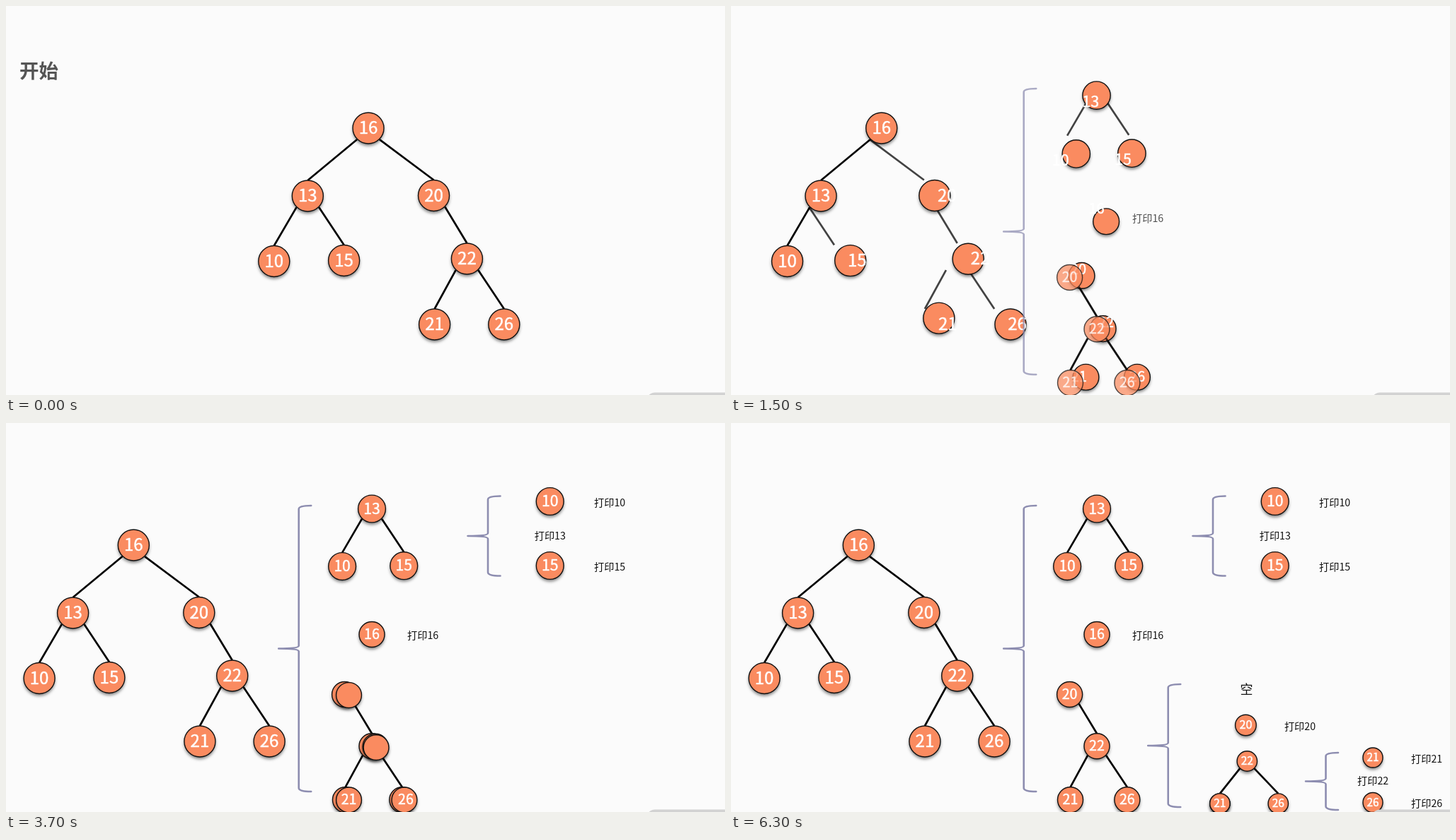
An HTML page with a canvas that plays this animation: 1016x551 px, repeating every 6.4 s.

```html
<!DOCTYPE html>
<html lang="zh">
<head>
<meta charset="utf-8">
<style>
  html, body { margin: 0; overflow: hidden; background: #fbfbfb; }
  canvas { display: block; }
</style>
</head>
<body>
<canvas id="stage" width="1016" height="551"></canvas>
<script>
const ctx = document.getElementById('stage').getContext('2d');
const FONT = '"Noto Sans CJK SC", "Noto Sans CJK", "Noto Sans CJK JP", sans-serif';
const LOOP = 6400, MOVE = 1000, RADIUS = 22;

const parent = { 13: 16, 20: 16, 10: 13, 15: 13, 22: 20, 21: 22, 26: 22 };
const tree = {
  16: [512, 173], 13: [426.3, 269], 20: [604.5, 268.5], 10: [378.8, 361.5],
  15: [477.6, 360.5], 22: [651.4, 358], 21: [605.6, 451], 26: [703.8, 451]
};

const clamp = x => Math.min(1, Math.max(0, x));
const ease = t => 1 - (1 - t ** 1.65) ** 2.87;
const fadeIn = t => clamp((t - 0.48) / 0.3);
const mix = (a, b, p) => a.map((n, i) => n + (b[i] - n) * p);
const twice = alpha => 1 - (1 - alpha) ** 2;

const isUnder = (v, root) => v === root || (v in parent && isUnder(parent[v], root));
const family = root => Object.keys(tree).map(Number).filter(v => isUnder(v, root));

// A copy of the subtree with its root at x, y: value -> [x, y, radius]
function place(root, x, y, r, spread = 1) {
  const scale = r / RADIUS, [rootX, rootY] = tree[root];
  return Object.fromEntries(family(root).map(v => [v, [
    x + (tree[v][0] - rootX) * scale * spread, y + (tree[v][1] - rootY) * scale, r]]));
}

const whole = place(16, 512, 173, RADIUS);
const moved = place(16, 180.3, 173, RADIUS);
const leftTree = place(13, 517, 121.5, 19.4);
const rightTree = place(20, 478.6, 384.5, 18);
const split = { ...leftTree, 16: [517, 299.5, 18], ...rightTree };
const leftLeaves = { 10: [768.7, 111, 19.4], 15: [768.7, 202, 19.4] };
const smallTree = place(22, 729.3, 479, 14.2, 1.3);
const rightSplit = { 20: [727.4, 428, 14.8], ...smallTree };
const rightLeaves = { 21: [907, 474, 14], 26: [907, 537.5, 14] };

// Discs are [value, value of the node the disc travels from], in stacking order
const movedDiscs = [[16, 16], [13, 13], [20, 13], [10, 10], [15, 10], [22, 15], [26, 21], [21, 15]];
const steps = [
  { start: 800, from: whole, to: split, brace: [413.7, 319.5, 202.5], printed: [16], gap: 50,
    discs: [[13, 16], [15, 20], [10, 20], [16, 22], [20, 22], [22, 21], [26, 26], [21, 26]] },
  { start: 2345, from: split, to: leftLeaves, brace: [681, 160, 56.5], printed: [10, 15], gap: 62.3,
    middle: 13, discs: [[10, 13], [15, 15]] },
  { start: 3645, from: split, to: rightSplit, brace: [617.7, 457, 87], printed: [20], gap: 54.5,
    late: [20, 22], discs: [[20, 20], [22, 22], [26, 22], [21, 26], [21, 21]] },
  { start: 4945, from: rightSplit, to: rightLeaves, brace: [840.5, 507.5, 40.5], printed: [21, 26], gap: 54,
    middle: 22, late: [21, 26], discs: [[21, 22], [26, 26]] }
];

function faded(alpha, draw) {
  ctx.globalAlpha = alpha;
  draw();
  ctx.globalAlpha = 1;
}

function disc([x, y, r], shadow = true) {
  ctx.beginPath();
  ctx.arc(x, y, r, 0, Math.PI * 2);
  ctx.save();
  if (shadow) {
    ctx.shadowColor = 'rgba(0,0,0,.5)';
    ctx.shadowBlur = 4;
    ctx.shadowOffsetY = 3;
  }
  ctx.fillStyle = '#fa8b60';
  ctx.fill();
  ctx.restore();
  ctx.strokeStyle = '#111';
  ctx.lineWidth = 1.4;
  ctx.stroke();
}

function number(v, [x, y, r]) {
  const size = r * 1.09;
  ctx.font = `500 ${size}px ${FONT}`;
  ctx.textAlign = 'center';
  ctx.fillStyle = ctx.strokeStyle = '#fff';
  ctx.lineWidth = 0.5;
  ctx.fillText(v, x, y + size * 0.335);
  ctx.strokeText(v, x, y + size * 0.335);
}

function label(str, x, y, size = 14.2, color = '#111', weight = 400) {
  ctx.font = `${weight} ${size}px ${FONT}`;
  ctx.textAlign = 'left';
  ctx.fillStyle = color;
  ctx.fillText(str, x, y + size * 0.37);
}

// Each edge runs from the parent's lower rim to the top of the child
function edges(layout, children, alpha = 1) {
  faded(alpha, () => {
    ctx.strokeStyle = '#000';
    ctx.lineWidth = 2.7;
    ctx.beginPath();
    for (const v of children) {
      const [x1, y1, r] = layout[parent[v]], [x2, y2] = layout[v];
      ctx.moveTo(x1 + Math.sign(x2 - x1) * r * 0.72, y1 + r * 0.73);
      ctx.lineTo(x2, y2 - r);
    }
    ctx.stroke();
  });
}

function bracket(x, mid, half) {
  ctx.strokeStyle = '#8d8db0';
  ctx.lineWidth = 2.6;
  ctx.lineCap = 'round';
  ctx.beginPath();
  for (const side of [-1, 1]) {
    const end = mid + side * half;
    ctx.moveTo(x + 17.5, end);
    ctx.quadraticCurveTo(x, end, x, end - side * 5);
    ctx.lineTo(x, mid + side * 4);
    ctx.quadraticCurveTo(x, mid, x - 28.5, mid);
  }
  ctx.stroke();
  ctx.lineCap = 'butt';
}

function drawStart() {
  label('开始', 19, 92, 27.5, '#555', 700);
  edges(whole, Object.keys(parent));
  for (const v in whole) {
    disc(whole[v]);
    number(v, whole[v]);
  }
}

// The whole tree slides left while its branches fade out and in again
function drawSlide(t) {
  const p = ease(t), shown = fadeIn(t), gone = clamp(1 - t / 0.4);
  const spine = [13, 10], branches = [20, 15, 22, 21, 26];
  edges(mix2(whole, moved, p), spine);
  edges(whole, spine, gone);
  edges(whole, branches, twice(gone));
  edges(moved, branches, shown);
  edges(split, [10, 15, 22, 21, 26], shown);
  for (const [v, origin] of movedDiscs) {
    disc(mix(whole[origin], moved[v], p));
    number(v, mix(whole[v], moved[v], p));
  }
}

function mix2(from, to, p) {
  return Object.fromEntries(Object.keys(to).map(v => [v, mix(from[v], to[v], p)]));
}

// Discs go below the numbers; late numbers appear once the move is over
function drawStep({ from, to, brace, printed, gap, middle, discs, late = [] }, t) {
  const p = ease(t), places = mix2(from, to, p);
  faded(fadeIn(t), () => {
    bracket(...brace);
    for (const v of printed) label('打印' + v, to[v][0] + gap, to[v][1] + 1.5);
    if (middle) label('打印' + middle, to[printed[0]][0] - 22, brace[1] - 0.5);
    if (to === rightSplit) label('空', 719.5, 377.5, 18);
  });
  if (to === rightSplit) edges(smallTree, [21, 26], twice(fadeIn(t)));
  for (const [v, origin] of discs) disc(mix(from[origin], to[v], p));
  for (const v in to)
    if (t === 1 || !late.includes(+v)) number(v, places[v]);
}

// A still copy of the right subtree fades in over the travelling one
function drawGhost(alpha) {
  edges(rightTree, [22, 21, 26], alpha);
  faded(alpha, () => {
    for (const v in rightTree) {
      disc(rightTree[v], false);
      number(v, rightTree[v]);
    }
  });
}

function frame() {
  const now = Math.floor(performance.now() % LOOP / 100) * 100;
  const progress = start => clamp((now - start) / MOVE);
  ctx.fillStyle = '#fbfbfb';
  ctx.fillRect(0, 0, 1016, 551);
  if (now < 700) drawStart();
  else drawSlide(progress(steps[0].start));
  steps.forEach((step, i) => {
    if (now >= (i ? step.start : 700)) drawStep(step, progress(step.start));
    const shown = fadeIn(progress(step.start));
    if (i === 0 && shown > 0 && shown < 1) drawGhost(shown);
  });
  ctx.fillStyle = '#d2d2d2';
  ctx.beginPath();
  ctx.roundRect(905, 547.5, 140, 24, 12);
  ctx.fill();
  requestAnimationFrame(frame);
}
frame();
</script>
</body>
</html>
```
